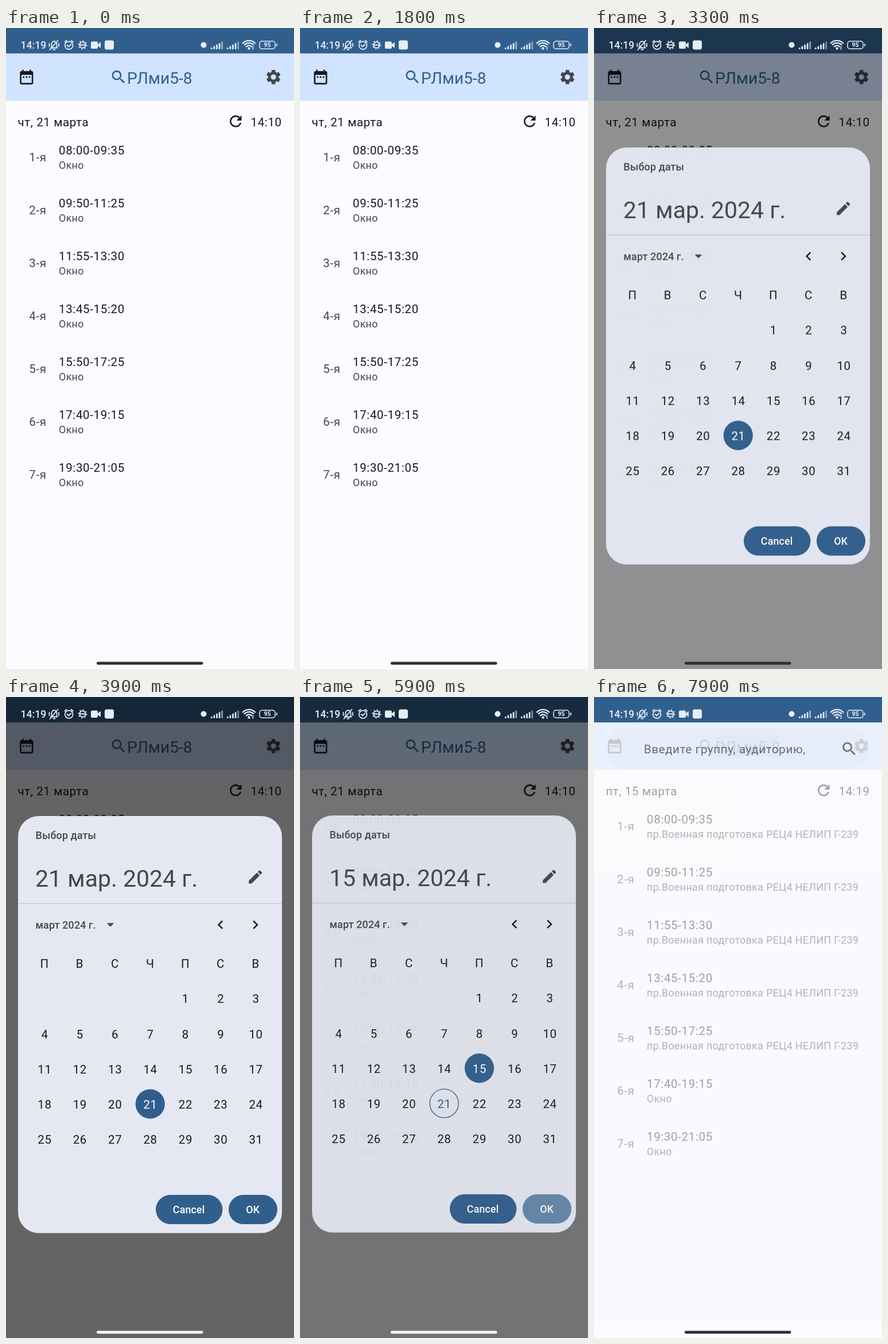
Animation of 502x1115 px, one loop 8000 ms. Source, as an HTML page:

```html
<!DOCTYPE html>
<html lang="ru">
<head>
<meta charset="utf-8">
<title>Расписание</title>
<style>
html, body { margin: 0; width: 100%; height: 100%; overflow: hidden; background: #fcfbff; }
svg { display: block; width: 100%; height: 100%; font-family: Roboto, "Noto Sans", sans-serif; }
.body { font-size: 20.5px; letter-spacing: .64px; }
.small { font-size: 17.9px; letter-spacing: .32px; }
.label { font-size: 17.9px; letter-spacing: .13px; font-weight: 500; }
.head { font-size: 41px; }
.title { font-size: 28.2px; }
.mid { text-anchor: middle; }
.ink { fill: #17191c; }
.soft { fill: #43474e; }
.blue { fill: #315f8d; }
.white { fill: #fff; }

.a { animation: 8s step-end infinite; }
.ripple { transform-box: fill-box; transform-origin: center; }
.old { animation-name: old; }
.new { animation-name: new; }
.before { animation-name: before; }
.after { animation-name: after; }
.icon-tap { animation-name: icon-tap; }
.day-tap { animation-name: day-tap; }
.ok-tap { animation-name: ok-tap; }
.title-tap { animation-name: title-tap; }
.dim { animation-name: dim; }
.dialog { animation-name: dialog; }
.pill { animation-name: pill; }
.veil { animation-name: veil; }
.bar { animation-name: bar; }
.hint { animation-name: hint; }
.spin { transform-box: fill-box; transform-origin: center; animation-name: show-spin, turn, sweep; }

@keyframes old { 0% { visibility: visible } 75% { visibility: hidden } }
@keyframes new { 0% { visibility: hidden } 83.75% { visibility: visible } }
@keyframes before { 0% { visibility: visible } 62.5% { visibility: hidden } }
@keyframes after { 0% { visibility: hidden } 62.5% { visibility: visible } }
@keyframes show-spin {
  0% { visibility: hidden } 75% { visibility: visible } 83.75% { visibility: hidden }
}
@keyframes turn {
  0% { transform: rotate(-75.8deg) }
  75% { transform: rotate(-75.8deg); animation-timing-function: steps(7, end) }
  83.75%, 100% { transform: rotate(74.5deg) }
}
@keyframes sweep {
  0% { stroke-dasharray: 0 360 }
  75% { stroke-dasharray: 6 360 }
  76.25% { stroke-dasharray: 40 360 }
  77.5% { stroke-dasharray: 115 360 }
  78.75% { stroke-dasharray: 195 360 }
  80% { stroke-dasharray: 248 360 }
  81.25% { stroke-dasharray: 279 360 }
  82.5% { stroke-dasharray: 290 360 }
}
@keyframes icon-tap {
  0% { opacity: 0; transform: scale(.4) }
  28.75% { opacity: .08; transform: scale(.6) }
  30% { opacity: .12; transform: scale(.85) }
  31.25% { opacity: .12; transform: none }
  36.25% { opacity: .08; transform: none }
  37.5% { opacity: .04; transform: none }
  38.75% { opacity: 0; transform: none }
}
@keyframes day-tap {
  0% { opacity: 0; transform: scale(.4) }
  58.75% { opacity: .08; transform: scale(.6) }
  60% { opacity: .12; transform: scale(.85) }
  61.25% { opacity: .16; transform: none }
  62.5% { opacity: .18; transform: none }
  65% { opacity: .13; transform: none }
  66.25% { opacity: .08; transform: none }
  67.5% { opacity: .04; transform: none }
  68.75% { opacity: 0; transform: none }
}
@keyframes ok-tap {
  0% { opacity: 0 } 70% { opacity: .08 } 71.25% { opacity: .17 } 72.5% { opacity: .25 }
  76.25% { opacity: 0 }
}
@keyframes title-tap {
  0% { opacity: 0 } 96.25% { opacity: .06 } 97.5% { opacity: .1 }
}
@keyframes dim {
  0% { opacity: 0 }
  40% { opacity: .2 } 41.25% { opacity: .43 } 42.5% { opacity: .56 } 43.75% { opacity: .6 }
  73.75% { opacity: .54 } 75% { opacity: .3 } 76.25% { opacity: .1 } 77.5% { opacity: 0 }
}
@keyframes dialog {
  0% { opacity: 0; transform: translateY(12px) }
  40% { opacity: .5; transform: translateY(12px) }
  41.25% { opacity: .975; transform: translateY(.8px) }
  42.5% { opacity: 1; transform: none }
  73.75% { opacity: .93; transform: translateY(-1px) }
  75% { opacity: .4; transform: translateY(-8px) }
  76.25% { opacity: 0; transform: translateY(-12px) }
}
@keyframes pill { 0% { fill: #2f2e33 } 42.5% { fill: #f6f6f8 } 76.25% { fill: #2f2e33 } }
@keyframes veil { 0% { opacity: 0 } 97.5% { opacity: .25 } 98.75% { opacity: .6 } }
@keyframes bar { 0% { opacity: 0 } 97.5% { opacity: .2 } 98.75% { opacity: .52 } }
@keyframes hint { 0% { opacity: 0 } 97.5% { opacity: .3 } 98.75% { opacity: .78 } }
</style>
</head>
<body>
<svg id="stage" viewBox="0 0 502 1115"></svg>
<script>
const ICONS = {
  calendar: 'M9 11H7v2h2v-2zm4 0h-2v2h2v-2zm4 0h-2v2h2v-2zm2-7h-1V2h-2v2H8V2H6v2H5c-1.11 0-1.99.9-1.99 2L3 20c0 1.1.89 2 2 2h14c1.1 0 2-.9 2-2V6c0-1.1-.9-2-2-2zm0 16H5V9h14v11z',
  search: 'M15.5 14h-.79l-.28-.27C15.41 12.59 16 11.11 16 9.5 16 5.91 13.09 3 9.5 3S3 5.91 3 9.5 5.91 16 9.5 16c1.61 0 3.09-.59 4.23-1.57l.27.28v.79l5 4.99L20.49 19l-4.99-5zm-6 0C7.01 14 5 11.99 5 9.5S7.01 5 9.5 5 14 7.01 14 9.5 11.99 14 9.5 14z',
  gear: 'M19.14 12.94c.04-.3.06-.61.06-.94 0-.32-.02-.64-.07-.94l2.03-1.58c.18-.14.23-.41.12-.61l-1.92-3.32c-.12-.22-.37-.29-.59-.22l-2.39.96c-.5-.38-1.03-.7-1.62-.94l-.36-2.54c-.04-.24-.24-.41-.48-.41h-3.84c-.24 0-.43.17-.47.41l-.36 2.54c-.59.24-1.13.57-1.62.94l-2.39-.96c-.22-.08-.47 0-.59.22L2.74 8.87c-.12.21-.08.47.12.61l2.03 1.58c-.05.3-.09.63-.09.94s.02.64.07.94l-2.03 1.58c-.18.14-.23.41-.12.61l1.92 3.32c.12.22.37.29.59.22l2.39-.96c.5.38 1.03.7 1.62.94l.36 2.54c.05.24.24.41.48.41h3.84c.24 0 .44-.17.47-.41l.36-2.54c.59-.24 1.13-.56 1.62-.94l2.39.96c.22.08.47 0 .59-.22l1.92-3.32c.12-.22.07-.47-.12-.61l-2.01-1.58zM12 15.6c-1.98 0-3.6-1.62-3.6-3.6s1.62-3.6 3.6-3.6 3.6 1.62 3.6 3.6-1.62 3.6-3.6 3.6z',
  refresh: 'M17.65 6.35C16.2 4.9 14.21 4 12 4c-4.42 0-7.99 3.58-7.99 8s3.57 8 7.99 8c3.73 0 6.84-2.55 7.73-6h-2.08c-.82 2.33-3.04 4-5.65 4-3.31 0-6-2.69-6-6s2.69-6 6-6c1.66 0 3.14.69 4.22 1.78L13 11h7V4l-2.35 2.35z',
  pencil: 'M3 17.25V21h3.75L17.81 9.94l-3.75-3.75L3 17.25zM20.71 7.04c.39-.39.39-1.02 0-1.41l-2.34-2.34c-.39-.39-1.02-.39-1.41 0l-1.83 1.83 3.75 3.75 1.83-1.83z',
  left: 'M15.41 7.41L14 6l-6 6 6 6 1.41-1.41L10.83 12z',
  right: 'M10 6L8.59 7.41 13.17 12l-4.58 4.59L10 18l6-6z',
  drop: 'M7 10l5 5 5-5z'
};
const TIMES = ['08:00-09:35', '09:50-11:25', '11:55-13:30', '13:45-15:20',
  '15:50-17:25', '17:40-19:15', '19:30-21:05'];
const LESSON = 'пр.Военная подготовка РЕЦ4 НЕЛИП Г-239';

const range = n => [...Array(n).keys()];
const icon = (name, x, y, cls) =>
  `<path d="${ICONS[name]}" transform="translate(${x} ${y}) scale(1.28)" class="${cls}"/>`;
// y is the middle of the capitals
const text = (x, y, cls, str) => `<text x="${x}" y="${y}" dy=".355em" class="${cls}">${str}</text>`;
const rect = (x, y, w, h, rx, attrs) =>
  `<rect x="${x}" y="${y}" width="${w}" height="${h}" rx="${rx}" ${attrs}/>`;
const circle = (x, y, r, attrs) => `<circle cx="${x}" cy="${y}" r="${r}" ${attrs}/>`;

function schedule(cls, date, updated, lessons) {
  const rows = TIMES.map((time, i) => {
    const y = 92 * i;
    return text(40.3, 225 + y, 'body soft', `${i + 1}-я`) +
      text(92, 213 + y, 'body ink', time) +
      text(92, 238.6 + y, 'small soft', i < lessons ? LESSON : 'Окно');
  });
  return `<g class="a ${cls}">${text(20.5, 163.5, 'body ink', date)}
    ${icon('refresh', 385, 147, 'ink')}${text(426.5, 163.5, 'body ink', updated)}${rows.join('')}</g>`;
}

const header = () => rect(0, 0, 502, 44.5, 0, 'class="blue"') +
  rect(0, 44.5, 502, 82, 0, 'fill="#d0e3ff"') +
  circle(35.7, 85.5, 25.6, 'class="a ripple icon-tap"') +
  icon('calendar', 20.5, 70, 'ink') +
  rect(212, 67, 109, 37, 0, 'class="a title-tap"') +
  icon('search', 180.8, 70, 'blue') +
  text(211, 86.5, 'title blue', 'РЛми5-8') +
  icon('gear', 450.8, 70, 'soft');

function statusBar() {
  const signal = (x, last) => range(5).map(i =>
    rect(x + 4.6 * i, 34 - 2.6 * i, 2.7, 3 + 2.6 * i, .8, `opacity="${i < 4 ? 1 : last}"`)).join('');
  const arc = r => `<path d="M${423.5 - r * .72} ${37 - r * .7}A${r} ${r} 0 0 1 ${423.5 + r * .72} ${37 - r * .7}"/>`;
  return `<g fill="#e7edf4">
    ${text(25.5, 30, '', '14:19').replace('<text', '<text font-size="17.6" font-weight="500"')}
    <g fill="none" stroke="#e7edf4" stroke-width="1.8" stroke-linecap="round">
      <path d="M78 34.5h11.500M79.500 34v-5a4.500 5 0 0 1 9-1.500v6.500M82.500 37.500h3M76.500 38l14-16.500M75.500 27v5M92 27v5"/>
      ${circle(109.700, 30.300, 6.900, '')}<path d="M106.500 30l2.700 2.500 4-4M102.300 24.500l3.200-2.800M117 24.500l-3.200-2.800"/>
      ${circle(133.500, 29.500, 5.200, '')}<path d="M128.500 29.500h10"/>
      ${circle(133.500, 29.500, 7, 'stroke-dasharray="2.2 3.300" stroke-linecap="butt"')}
      <g stroke-width="2.200">${arc(6.500)}${arc(11)}${arc(15)}</g>
      ${rect(442, 23, 27, 13.200, 4.200, 'stroke-width="1.500"')}<path d="M472 28v3"/>
    </g>
    ${rect(148, 23.500, 12, 12.500, 2, '')}<path d="M160 28.500l5-4v10.500l-5-4z"/>
    ${rect(172, 21.500, 16, 16, 3.500, '')}
    ${circle(344.500, 29.500, 5, '')}
    ${signal(357, .6)}${signal(385, .5)}
    ${circle(423.500, 35.500, 2.200, '')}<path d="M428.500 34l2-2.500 2 2.500zM428.500 35.500h4l-2 2.500z"/>
    <text x="455.500" y="33.400" font-size="10.500" font-weight="700" class="mid">95</text>
  </g>`;
}

function calendar() {
  const colX = i => 67.2 + 61.35 * i;
  const rowY = i => 525 + 61.3 * i;
  const days = range(31).map(i => {
    const n = i + 1, slot = i + 4;
    const x = colX(slot % 7), y = rowY(Math.floor(slot / 7));
    const label = cls => text(x + .3, y, 'body mid ' + cls, n);
    const disc = cls => circle(x, y - 1, 25.6, `class="${cls}"`);
    if (n === 15) {
      return label('ink a before') + disc('blue a after') + label('white a after') +
        disc('a ripple day-tap');
    }
    if (n === 21) {
      return disc('blue a before') + label('white a before') +
        circle(x, y - 1, 25, 'class="a after" fill="none" stroke="#315f8d" stroke-width="1.3"') +
        label('blue a after');
    }
    return label('ink');
  });
  return [...'ПВСЧПСВ'].map((d, i) => text(colX(i), 464, 'body mid ink', d)).join('') + days.join('');
}

const dialog = () => `<g class="a dialog">
  ${rect(21, 207, 460, 725.5, 36, 'fill="#e5e8f2"')}
  ${text(51.5, 240.5, 'label soft', 'Выбор даты')}
  ${text(51, 315, 'head soft a before', '21 мар. 2024 г.')}
  ${text(51, 315, 'head soft a after', '15 мар. 2024 г.')}
  ${icon('pencil', 419.4, 297.7, 'soft')}
  ${rect(21, 358.6, 460, 1.3, 0, 'fill="#c4c6cf"')}
  ${text(51.5, 397, 'label soft', 'март 2024 г.')}
  ${icon('drop', 166.6, 380.5, 'soft')}
  ${icon('left', 358.5, 380.8, 'ink')}${icon('right', 419.3, 380.8, 'ink')}
  ${calendar()}
  ${rect(261, 866, 116.5, 51, 25.5, 'class="blue"')}${text(318.7, 892, 'label white mid', 'Cancel')}
  ${rect(388, 866, 85, 51, 25.5, 'class="blue"')}
  ${rect(388, 866, 85, 51, 25.5, 'class="white a ok-tap"')}
  ${text(430.2, 892, 'label white mid', 'OK')}
</g>`;

const searchBar = () => rect(0, 44.5, 502, 1049.5, 0, 'class="a veil" fill="#fbfbfe"') +
  rect(21, 54, 460, 72, 36, 'class="a bar" fill="#e4eaf6"') +
  `<g class="a hint">${text(87, 90.5, 'body soft', 'Введите группу, аудиторию,')}
    ${icon('search', 429.5, 74.8, 'soft')}</g>`;

document.getElementById('stage').innerHTML =
  rect(0, 0, 502, 1115, 0, 'fill="#fcfbff"') +
  header() +
  schedule('old', 'чт, 21 марта', '14:10', 0) +
  circle(251, 610.5, 23, 'class="a spin" pathLength="360" fill="none" stroke="#315f8d" stroke-width="5.1"') +
  schedule('new', 'пт, 15 марта', '14:19', 5) +
  searchBar() +
  rect(0, 0, 502, 1115, 0, 'class="a dim"') +
  dialog() +
  statusBar() +
  rect(158, 1102.5, 185.5, 5, 2.5, 'class="a pill"');
</script>
</body>
</html>
```
